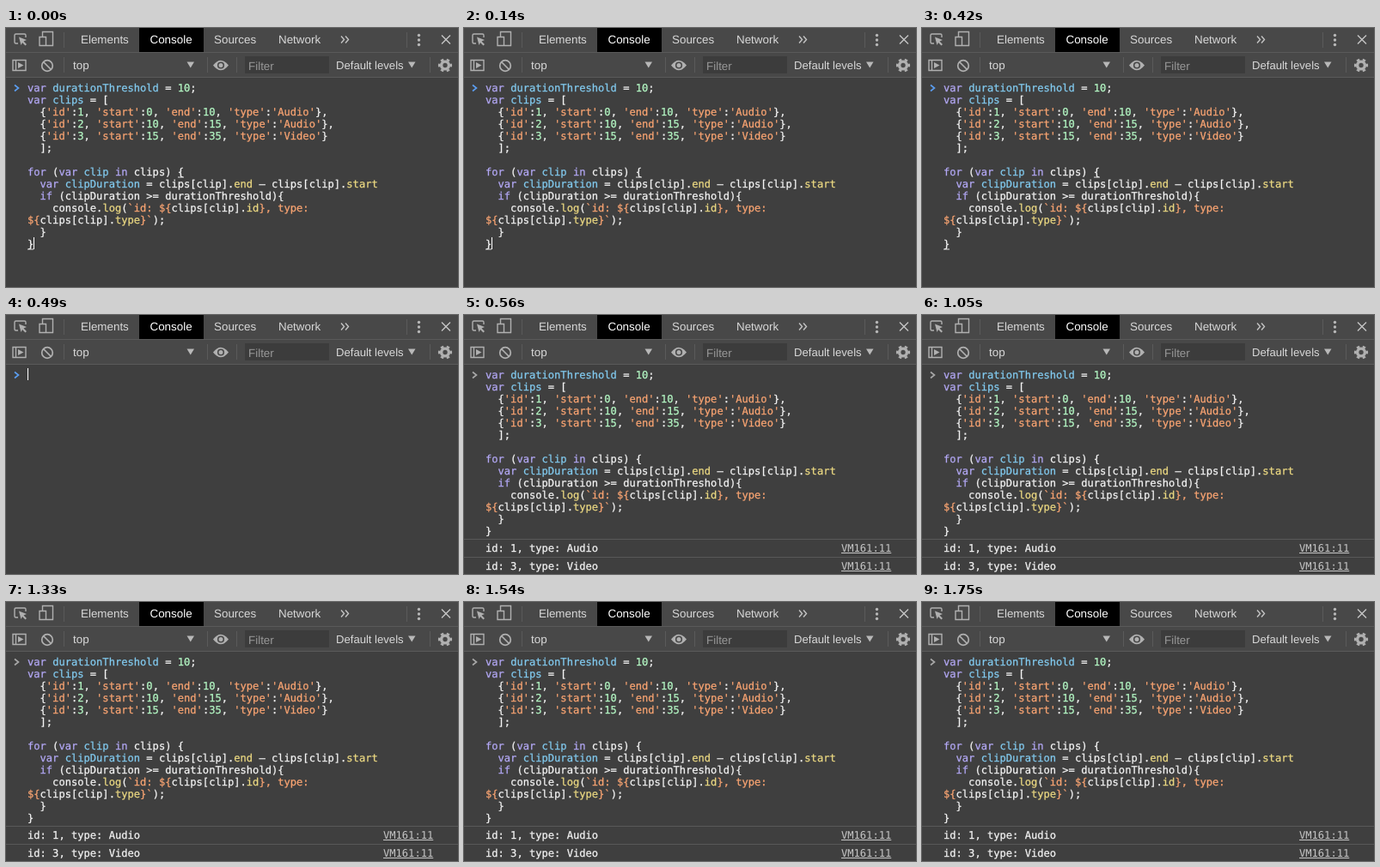
These frames come from a looping animation (526 by 302 pixels, 1820 ms). An HTML page:

```html
<!DOCTYPE html>
<html lang="en">
<head>
<meta charset="utf-8">
<title>Console</title>
<style>
html, body { margin: 0; width: 100%; height: 100%; overflow: hidden; background: #3f3f3f; }
#stage { position: relative; width: 526px; height: 302px; overflow: hidden; background: #3f3f3f; }
svg { position: absolute; left: 0; top: 0; }
svg text { font: 13.4px "Liberation Sans", Arial, sans-serif; fill: #d8d8d8; text-rendering: geometricPrecision; }
#code, .log {
  position: absolute; margin: 0; white-space: pre; color: #f4f4f4;
  font: 12.1px/14px "DejaVu Sans Mono", Menlo, monospace;
  text-rendering: geometricPrecision; -webkit-text-stroke: .25px;
}
#code { left: 25px; top: 62px; transform: translateY(.5px); }
.k { color: #b3a8f5; }
.d { color: #82cbf0; }
.n { color: #b4f8c4; }
.s { color: #f9a472; }
.p { color: #ecd982; }
.editing .m { box-shadow: inset 0 -1px #e6e6e6; }
#caret { position: absolute; width: 1px; height: 14px; background: #fff; }
.log { left: 0; width: 501px; height: 20px; padding-left: 25px; border-top: 1px solid #595959; line-height: 20px; }
.log u { position: absolute; left: 439px; color: #c6c6c6; -webkit-text-stroke: 0; }
</style>
</head>
<body>
<div id="stage">
  <svg width="526" height="302" fill="none" stroke="#b0b0b0" stroke-width="1.4">
    <path fill="#484848" stroke="none" d="M0 0H526V57H0Z"/>
    <path fill="#000" stroke="none" d="M155 0H230V28H155Z"/>
    <path stroke="#5a5a5a" stroke-width="1" d="M0 28.5H526M0 57.5H526M67.5 5V23M67.5 34V52M466.5 5V23M234.5 34V52M268.5 34V52M493.5 34V52"/>

    <path d="M14 18H11.5Q10 18 10 16.500V8.500Q10 7 11.500 7H21.500Q23 7 23 8.500V11"/>
    <path fill="#b0b0b0" stroke="none" d="M15 10.500L24 14L20.500 15.500L24 19L22.500 20.500L19 17L17.500 20Z"/>
    <path d="M42.500 10V4.500H54.500V20.500H47M39 10.500H46.500V20.500H39Z"/>

    <path d="M8 37.500H23V49.500H8ZM11.500 37.500V49.500"/>
    <path fill="#b0b0b0" stroke="none" d="M14 40L20.500 43.500L14 47Z"/>
    <g stroke-width="1.7"><circle cx="48" cy="44" r="6.300"/><path d="M43.500 39.500L52.500 48.500"/></g>

    <path stroke="#c4c4c4" d="M390 9.500L393.500 13.500L390 17.500M395 9.500L398.500 13.500L395 17.500"/>
    <g fill="#b8b8b8" stroke="none">
      <circle cx="480.500" cy="8.500" r="1.700"/><circle cx="480.500" cy="14" r="1.700"/><circle cx="480.500" cy="19.500" r="1.700"/>
      <path d="M210.500 39.500H219L214.750 46.500ZM468 39.500H476.500L472.250 46.500Z"/>
    </g>
    <path stroke="#c4c4c4" d="M507 8.500L517 18.500M517 8.500L507 18.500"/>

    <path fill="#b0b0b0" stroke="none" d="M241 43.500Q250 32 259 43.500Q250 55 241 43.500Z"/>
    <circle cx="250" cy="43.500" r="3.300" fill="#b0b0b0" stroke="#484848" stroke-width="1.600"/>
    <path fill="#3c3c3c" stroke="none" d="M278 33H376V53H278Z"/>
    <circle cx="511" cy="43.500" r="4.400" stroke-width="3.400"/>
    <circle cx="511" cy="43.500" r="6.800" stroke-width="2.600" pathLength="12" stroke-dasharray="1" stroke-dashoffset=".5"/>

    <g stroke="none">
      <text x="87" y="18">Elements</text>
      <text x="167.500" y="18" style="fill:#fff">Console</text>
      <text x="242" y="18">Sources</text>
      <text x="317" y="18">Network</text>
      <text x="78" y="48">top</text>
      <text x="282" y="49" style="fill:#989898">Filter</text>
      <text x="384" y="48" style="font-size:13.100px">Default levels</text>
    </g>
    <path id="prompt" stroke-width="1.600" d="M10 66.500L14.500 70L10 73.500"/>
  </svg>
  <pre id="code"></pre>
  <div id="caret"></div>
  <div id="logs">
    <div class="log" style="top:261px">id: 1, type: Audio<u>VM161:11</u></div>
    <div class="log" style="top:282px">id: 3, type: Video<u>VM161:11</u></div>
  </div>
</div>
<script>
const $ = id => document.getElementById(id);
const LOOP = 1820;
const source = [
  "var durationThreshold = 10;",
  "var clips = [",
  "  {'id':1, 'start':0, 'end':10, 'type':'Audio'},",
  "  {'id':2, 'start':10, 'end':15, 'type':'Audio'},",
  "  {'id':3, 'start':15, 'end':35, 'type':'Video'}",
  "  ];",
  "",
  "for (var clip in clips) {",
  "  var clipDuration = clips[clip].end \u2013 clips[clip].start",
  "  if (clipDuration >= durationThreshold){",
  "    console.log(`id: ${clips[clip].id}, type:",
  "${clips[clip].type}`);",
  "  }",
  "}"
].join("\n");

const rules = [
  ["s", /'[^']*'|`id: \$\{|\}, type:|^\$\{|\}`/],
  ["d", /(?<=var )\w+/],
  ["k", /\b(?:var|for|in|if)\b/],
  ["p", /(?<=\.)\w+/],
  ["n", /\b\d+\b/],
  ["m", /(?<=\) )\{|^\}$/]
];
const pattern = new RegExp(rules.map(([name, re]) => `(?<${name}>${re.source})`).join("|"), "gm");
$("code").innerHTML = source.replace(pattern, (text, ...rest) => {
  const groups = rest.at(-1);
  const name = Object.keys(groups).find(key => groups[key] !== undefined);
  return `<span class="${name}">${text}</span>`;
});

// start, code shown, editing, logs shown, caret position
const steps = [
  [0, true, true, false, [32, 244]],
  [280, true, true, false, null],
  [490, false, true, false, [25, 62]],
  [560, true, false, true, null]
];

function show(el, on) {
  el.style.visibility = on ? "visible" : "hidden";
}

function draw(now) {
  const t = now % LOOP;
  const [, code, editing, logs, caret] = steps.findLast(step => step[0] <= t);
  show($("code"), code);
  show($("logs"), logs);
  show($("caret"), caret);
  if (caret) {
    $("caret").style.left = caret[0] + "px";
    $("caret").style.top = caret[1] + "px";
  }
  $("stage").classList.toggle("editing", editing);
  $("prompt").style.stroke = editing ? "#5b9df0" : "#a8a8a8";
}

const start = performance.now();
function tick() {
  draw(performance.now() - start);
  requestAnimationFrame(tick);
}
tick();
</script>
</body>
</html>
```
